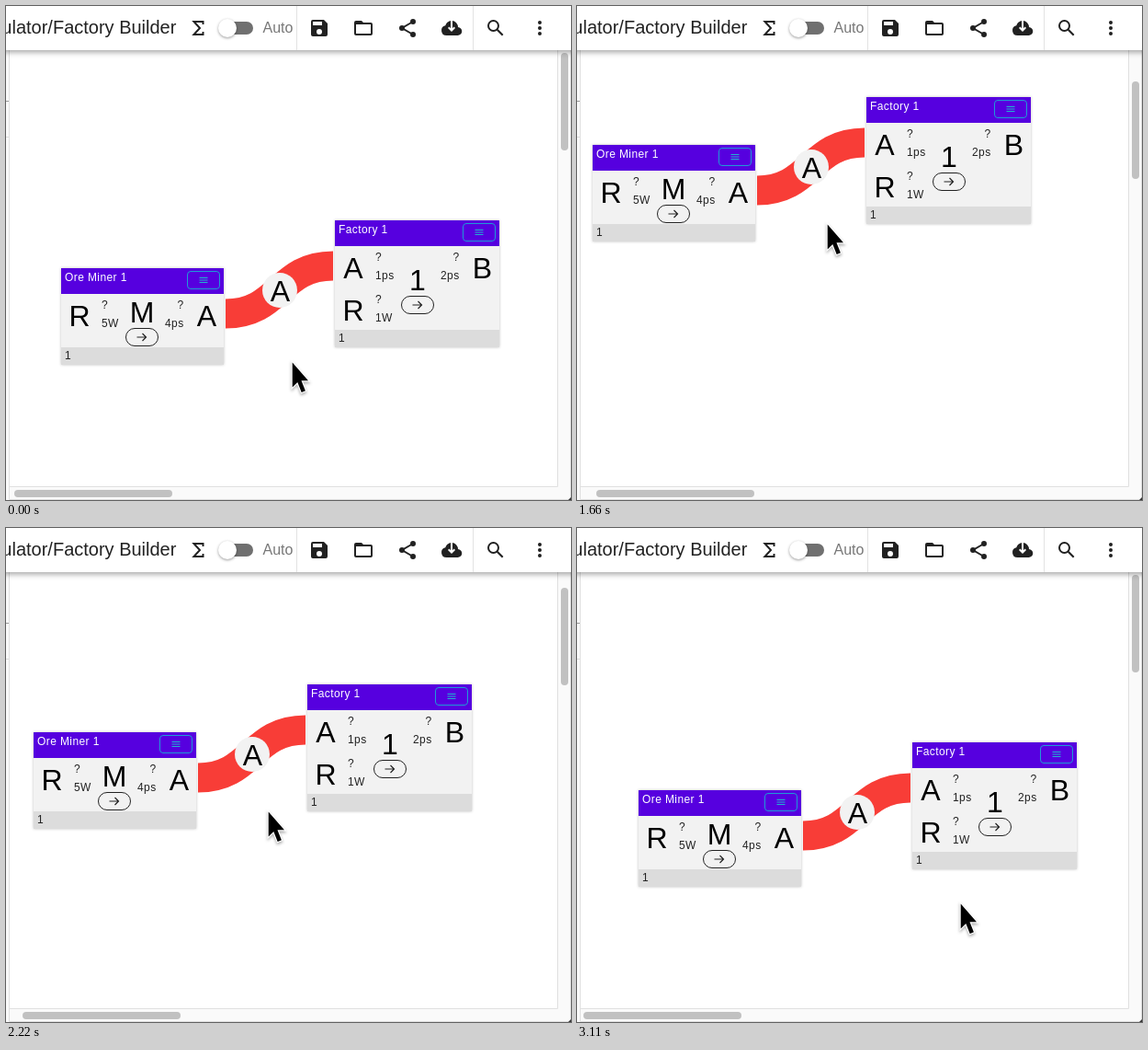
Write an HTML page that moves like this. It is 615 px wide and 537 px high and loops after 3190 ms.

```html
<!DOCTYPE html>
<html lang="en">
<head>
<meta charset="utf-8">
<title>Factory Builder</title>
<style>
  html, body { margin: 0; width: 100%; height: 100%; overflow: hidden; background: #fff; }
  svg { display: block; width: 615px; height: 537px; }
  text { font-family: "Liberation Sans", Arial, sans-serif; }
  .title { font-size: 20px; fill: #212121; }
  .auto { font-size: 16px; fill: #777; }
  .small { font-size: 12px; letter-spacing: .4px; fill: #222; }
  .name { font-size: 12px; letter-spacing: .4px; fill: #fff; }
  .big { font-size: 32px; text-anchor: middle; fill: #000; }
  .end { text-anchor: end; }
  .thumb { fill: #c1c1c1; }
  .card { filter: drop-shadow(0 0 1.5px rgba(0, 0, 0, .25)); }
  .bar { filter: drop-shadow(0 2px 3px rgba(0, 0, 0, .38)); }
  .knob { filter: drop-shadow(0 1px 1.5px rgba(0, 0, 0, .4)); }
  .arrow { filter: drop-shadow(0 2px 1.5px rgba(0, 0, 0, .3)); }
</style>
</head>
<body>
<svg id="stage" viewBox="0 0 615 537"></svg>
<script>
const LOOP = 3190;
const TICK = 80;
const DRAG_START = 1420;
const GRIP = { x: 315, y: 371 };
const LIMIT = { x: 7, y: 0 };

// Pointer strokes: start time, then [tick, x, y] key points joined by a smooth curve.
const strokes = [
  { start: 0, keys: [[0, 311, 387], [1, 311, 389]] },
  { start: 250, keys: [[0, 309, 386], [2, 315, 374]] },
  { start: 660, keys: [[0, 315, 372], [1, 315, 371]] },
  { start: DRAG_START, keys: [[0, 315, 360], [3, 272, 237], [7, 221, 279], [10.5, 297, 310], [14, 378, 298], [17, 358, 372]] },
  { start: 2950, keys: [[0, 366, 380], [2, 417, 408]] }
];

const text = (cls, x, y, s) => `<text class="${cls}" x="${x}" y="${y}">${s}</text>`;
const rect = (x, y, w, h, fill, more = '') =>
  `<rect x="${x}" y="${y}" width="${w}" height="${h}" fill="${fill}" ${more}/>`;
const circle = (x, y, r, more = '') => `<circle cx="${x}" cy="${y}" r="${r}" ${more}/>`;
const line = (d, color, width = 1) =>
  `<path d="${d}" fill="none" stroke="${color}" stroke-width="${width}"/>`;
const shape = d => `<path fill-rule="evenodd" d="${d}"/>`;

function port(x, y, letter, rate) {
  return text('big', x + 20, y + 62.5, letter) +
    text('small', x + 44, y + 44, '?') + text('small', x + 44, y + 64, rate);
}

function outPort(right, y, letter, rate) {
  return text('big', right - 18.5, y + 62.5, letter) +
    text('small end', right - 43.4, y + 44, '?') + text('small end', right - 43.4, y + 64, rate);
}

function machine(x, y, letter) {
  return text('big', x, y - 16.5, letter) +
    rect(x - 17.5, y - 9.5, 35, 19, 'none', 'rx="9.5" stroke="#222"') +
    line(`M${x - 5.5} ${y}h10m-4-4l4 4-4 4`, '#222', 1.2);
}

function card(x, y, w, h, name) {
  const menu = x + w - 40;
  return '<g class="card">' + rect(x, y, w, h, '#f2f2f2') + '</g>' +
    rect(x, y, w, 28, '#5600df') + rect(x, y + h - 19, w, 19, '#dcdcdc') +
    text('name', x + 4, y + 14, name) + text('small', x + 4, y + h - 6, '1') +
    rect(menu + .5, y + 3.5, 35, 19, 'none', 'rx="3.5" stroke="#1f9bd6"') +
    line(`M${menu + 13.5} ${y + 10.5}h9m-9 2.5h9m-9 2.5h9`, '#1fb4d0');
}

const miner = card(60, 285, 177, 105, 'Ore Miner 1') +
  port(60, 285, 'R', '5W') + machine(148, 360, 'M') + outPort(237, 285, 'A', '4ps');

const factory = card(358, 233, 179, 138, 'Factory 1') +
  port(358, 233, 'A', '1ps') + port(358, 279, 'R', '1W') +
  machine(448, 325, '1') + outPort(537, 233, 'B', '2ps');

const belt = line('M239 334.5C298 334.5 297 282.5 356 282.5', '#f83d37', 32) +
  circle(298, 309, 19, 'fill="#f2f2f2"') + text('big', 298.5, 321, 'A');

const icons = {
  209: line('M17.5 8V5H7.5l6.5 7-6.5 7h10v-3', '#212121', 2),
  341: shape('M17 3H5a2 2 0 0 0-2 2v14a2 2 0 0 0 2 2h14a2 2 0 0 0 2-2V7zM12 19a3 3 0 1 1 0-6 3 3 0 0 1 0 6zM15 9H5V5h10z'),
  389: shape('M20 6h-8l-2-2H4a2 2 0 0 0-2 2v12a2 2 0 0 0 2 2h16a2 2 0 0 0 2-2V8a2 2 0 0 0-2-2zM20 18H4V8h16z'),
  437: line('M18 5L6 12l12 7', '#212121', 2) + circle(18, 5, 3) + circle(6, 12, 3) + circle(18, 19, 3),
  485: shape('M6.5 20A5.5 5.5 0 0 1 5.25 9.15 8 8 0 0 1 11 4.08v8.07L9.4 10.6 8 12l4 4 4-4-1.4-1.4-1.6 1.55V4.08A7 7 0 0 1 19 11a4.5 4.5 0 0 1-.5 9z'),
  533: circle(9.5, 9.5, 5.5, 'fill="none" stroke="#212121" stroke-width="2"') + line('M13.7 13.7l6 6', '#212121', 2.1),
  581: [6, 12, 18].map(y => circle(12, y, 2)).join('')
};

const header = '<g class="bar">' + rect(-10, -10, 635, 58, '#fff') + '</g>' +
  line('M316.5 0V48M508.5 0V48', '#e2e2e2') +
  text('title end', 185.4, 30, 'ulator/Factory Builder') +
  rect(235, 17, 34, 14, '#707070', 'rx="7"') +
  circle(241, 24, 10, 'class="knob" fill="#fff"') +
  text('auto', 279.5, 29, 'Auto') +
  Object.entries(icons).map(([x, content]) =>
    `<g transform="translate(${x - 12} 12)" fill="#212121">${content}</g>`).join('');

const frame = rect(0, 48, 3, 489, '#fafafa') +
  rect(600, 48, 15, 489, '#fafafa') + rect(4, 522, 611, 15, '#fafafa') +
  line('M3.5 48V536.5H614.5V48M600.5 48V522.5M4 522.5H600.5', '#e0e0e0') +
  line('M0 103.5H3', '#999') + line('M0 142.5H3', '#ddd') +
  '<path d="M615 534v3h-3z" fill="#333"/>';

document.getElementById('stage').innerHTML =
  '<clipPath id="view"><rect x="4" y="48" width="596" height="474"/></clipPath>' +
  rect(0, 0, 615, 537, '#fff') +
  `<g clip-path="url(#view)"><g id="scene">${belt}${miner}${factory}</g></g>` + frame +
  '<rect id="thumbX" class="thumb" y="526" width="172" height="8" rx="4"/>' +
  '<rect id="thumbY" class="thumb" x="604" width="8" height="106" rx="4"/>' +
  header +
  '<g id="pointer"><path class="arrow" d="M.7.5V27.5L6.3 22 10.7 33 14.9 31.2 10.5 20.3H18z" ' +
  'fill="#000" stroke="#fff" stroke-width="2.4" paint-order="stroke"/></g>';

// Cubic Hermite curve through the keys, with slopes taken from the neighbours.
function along(keys, tick) {
  const last = keys.length - 1;
  const i = Math.max(0, keys.findIndex(k => k[0] >= tick) - 1);
  const span = keys[i + 1][0] - keys[i][0];
  const u = (tick - keys[i][0]) / span;
  const slope = (n, axis) => {
    const a = keys[Math.max(0, n - 1)], b = keys[Math.min(last, n + 1)];
    return (b[axis] - a[axis]) / (b[0] - a[0]) * span;
  };
  return [1, 2].map(axis => {
    const p = keys[i][axis], q = keys[i + 1][axis];
    const ease = u * u * (3 - 2 * u);
    return p + (q - p) * ease + slope(i, axis) * u * (1 - u) ** 2 - slope(i + 1, axis) * u * u * (1 - u);
  }).map(Math.round);
}

const poses = strokes.flatMap(({ start, keys }) => {
  const ticks = keys[keys.length - 1][0];
  return Array.from({ length: ticks + 1 }, (_, tick) => {
    const [x, y] = along(keys, tick);
    const dragged = start >= DRAG_START;
    return {
      time: start + tick * TICK, x, y,
      dx: dragged ? Math.min(x - GRIP.x, LIMIT.x) : 0,
      dy: dragged ? Math.min(y - GRIP.y, LIMIT.y) : 0
    };
  });
});

// Each pose holds until the next one.
function play(id, place) {
  const frames = poses.map(pose => {
    const [x, y] = place(pose);
    return { offset: pose.time / LOOP, transform: `translate(${x}px, ${y}px)`, easing: 'steps(1, end)' };
  });
  frames.push({ ...frames[frames.length - 1], offset: 1 });
  document.getElementById(id).animate(frames, { duration: LOOP, iterations: Infinity });
}

play('scene', p => [p.dx, p.dy]);
play('pointer', p => [p.x, p.y]);
play('thumbX', p => [Math.floor(9.3 - p.dx * .295), 0]);
play('thumbY', p => [0, Math.round(51 - p.dy * .23)]);
</script>
</body>
</html>
```
